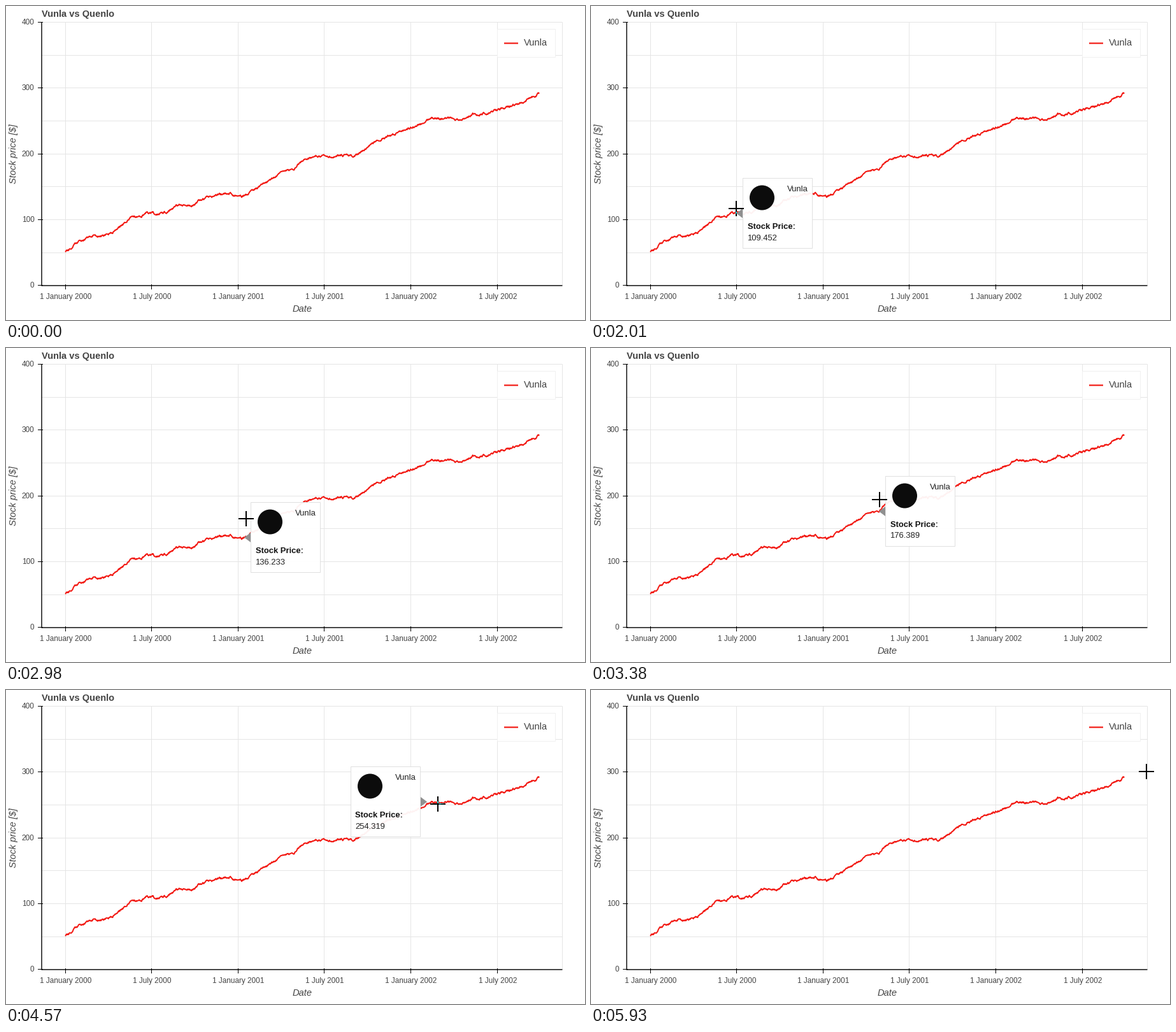
Animation, 909 px wide and 493 px high, one loop 6.96 s. Source, as a matplotlib script:

```python
import numpy as np
import matplotlib.pyplot as plt
from matplotlib.animation import FuncAnimation
from matplotlib.patches import Circle, Polygon, Rectangle
from matplotlib.path import Path
from matplotlib.transforms import Affine2D

W, H, DPI = 909, 493, 64
LOOP, INTERVAL = 6960, 20
PX = 72 / DPI  # points per pixel
RED, CYAN, GRID, INK = "#f21a14", "#0de5eb", "#e5e5e5", "#444444"
LEFT, RIGHT, TOP, BASE = 56, 873.5, 25.5, 439
NAME, RIVAL = "Vunla", "Quenlo"

plt.rcParams["font.family"] = "Liberation Sans"
fig = plt.figure(figsize=(W / DPI, H / DPI), dpi=DPI, facecolor="white")
ax = fig.add_axes([0, 0, 1, 1])
ax.set_xlim(0, W)
ax.set_ylim(H, 0)
ax.axis("off")

tip_shift, cursor_shift = Affine2D(), Affine2D()
tip_space = tip_shift + ax.transData
cursor_space = cursor_shift + ax.transData


def price_y(price):
    return 438.8 - 1.0333 * price


def segment(xs, ys, color="black", width=1.0, z=1):
    return ax.plot(xs, ys, color=color, lw=width * PX, zorder=z, snap=False,
                   solid_capstyle="butt")[0]


def label(x, y, text, size, color=INK, z=4, **kw):
    return ax.text(x, y, text, fontsize=size * PX, color=color, zorder=z,
                   va="baseline", parse_math=False, **kw)


# Grid and axes
for price in range(0, 401, 50):
    y = int(price_y(price)) + 0.5
    segment([LEFT, RIGHT], [y, y], GRID)
    if price % 100 == 0:
        segment([50, 58], [y, y], z=3)
        label(44.6, y + 3.2, str(price), 11.75, ha="right")

for half_year in range(6):
    x = int(93 + 135.6 * half_year) + 0.5
    month = "July" if half_year % 2 else "January"
    segment([x, x], [TOP, BASE], GRID)
    segment([x, x], [437, 445], z=3)
    label(x + 0.4, 460, f"1 {month} {2000 + half_year // 2}", 11.75, ha="center")
segment([RIGHT, RIGHT], [TOP, BASE], GRID)
segment([LEFT, LEFT], [TOP, BASE + 0.7], width=1.4, z=3)
segment([LEFT, RIGHT], [BASE, BASE], width=1.4, z=3)

label(56, 17, f"{NAME} vs {RIVAL}", 14.6, weight="bold")
label(465, 480.5, "Date", 14.67, style="italic", ha="center")
label(16, 232, "Stock price [$]", 14.75, style="italic", ha="center",
      rotation=90, rotation_mode="anchor")

# Price curve: a trend through key points (x, price) plus daily drifting noise
TREND_X, TREND = np.transpose([
    (93, 50.9), (102, 55.719), (113, 67.4), (137, 76.1), (151, 74.1),
    (174, 84.8), (196, 103.2), (210, 103.2), (221, 110.9), (228, 109.452),
    (253, 110.9), (271, 122.5), (296, 123.091), (303, 129.3), (347, 140.9),
    (372, 135.1), (396, 148.7), (434, 172.8), (452, 176.389), (465, 189.3),
    (486, 197), (548, 197), (584, 221.2), (654, 246.4), (661, 254.319),
    (714, 252.2), (733, 260), (755, 262.945), (803, 275.4), (837, 290.9)])
rng = np.random.default_rng(7)
curve_x = np.linspace(93, 837, 1000)
noise = np.zeros(curve_x.size)
for day in range(1, noise.size):
    noise[day] = 0.8 * noise[day - 1] + rng.uniform(-1.3, 1.3)
curve_y = price_y(np.interp(curve_x, TREND_X, TREND) + noise)
segment(curve_x, curve_y, RED, 2, z=2)

# Legend
ax.add_patch(Rectangle((771.5, 36.5), 91, 44, fc=(1, 1, 1, 0.95),
                       ec="#f0f0f0", lw=PX, zorder=3, snap=False))
segment([782, 804], [58.5, 58.5], RED, 2.2, z=4)
label(813, 62.5, NAME, 14.67)

# Tooltip, in coordinates from its top left corner
price_text = label(7, 97.5, "", 13, "#222222", 7, transform=tip_space)
box = Rectangle((0.5, 0.5), 109, 110, fc=(1, 1, 1, 0.95), ec="#e0e0e0",
                lw=PX, zorder=6, snap=False, transform=tip_space)
badge = Circle((30.5, 31), 19.5, fc="#0c0c0c", lw=0, zorder=7, transform=tip_space)
arrow_left, arrow_right = (
    Polygon([(tip, 55.5), (edge, 48), (edge, 63)], fc="#909090", lw=0,
            zorder=5, transform=tip_space)
    for tip, edge in ((-10, 0), (120, 110)))
for patch in (box, badge, arrow_left, arrow_right):
    ax.add_patch(patch)
tip_parts = [
    box, badge, price_text,
    label(69.5, 21, NAME, 13, "#222222", 7, transform=tip_space),
    label(7.5, 80, "Stock Price:", 13, "#111111", 7, weight="bold",
          transform=tip_space)]

# Crosshair pointer: inverts what it covers, so the curve turns cyan under it
arm = [(-1, -1), (-1, -12), (1, -12), (1, -1)]
CROSS = np.concatenate([Affine2D().rotate_deg(90 * turn).transform(arm)
                        for turn in range(4)])
cross = Polygon(CROSS, fc="black", lw=0, zorder=8, transform=cursor_space)
ax.add_patch(cross)
inverted = segment(curve_x, curve_y, CYAN, 2, z=9)
inverted.set_clip_path(Path(np.vstack([CROSS, CROSS[:1]]), closed=True), cursor_space)

# The pointer is sampled at a steady rate; the tooltip trails slightly behind it
FIRST_MOVE, PERIOD = 1010, 196.8
TIP_FROM, LAST_STEP = 2, 24
STEP, CURSOR_X, CURSOR_Y, TIP_X = np.transpose([
    (0, 80, 482, 80), (2, 102, 367, 102), (5, 228, 318, 228),
    (8, 301, 298, 296), (12, 453, 238, 452), (18, 678, 179, 661),
    (21, 763, 160, 755), (24, 872, 128, 866)])


def draw(frame):
    now = (frame + 0.5) * INTERVAL
    step = int((now - FIRST_MOVE) // PERIOD)
    pointing = 0 <= step <= LAST_STEP
    hovering = TIP_FROM <= step < LAST_STEP
    x, y, anchor = (np.interp(step, STEP, path) for path in (CURSOR_X, CURSOR_Y, TIP_X))
    price = np.interp(anchor, TREND_X, TREND)
    flipped = anchor > (LEFT + RIGHT) / 2

    cursor_shift.clear().translate(round(x), round(y))
    tip_shift.clear().translate(round(anchor) + (-120 if flipped else 10),
                                round(price_y(price) - 55.9))
    price_text.set_text(f"{price:.3f}")

    for part in (cross, inverted):
        part.set_visible(pointing)
    for part in tip_parts:
        part.set_visible(hovering)
    arrow_left.set_visible(hovering and not flipped)
    arrow_right.set_visible(hovering and flipped)
    return [cross, inverted, arrow_left, arrow_right, *tip_parts]


animation = FuncAnimation(fig, draw, frames=LOOP // INTERVAL, interval=INTERVAL,
                          repeat=True, repeat_delay=0, blit=False)
plt.show()
```
